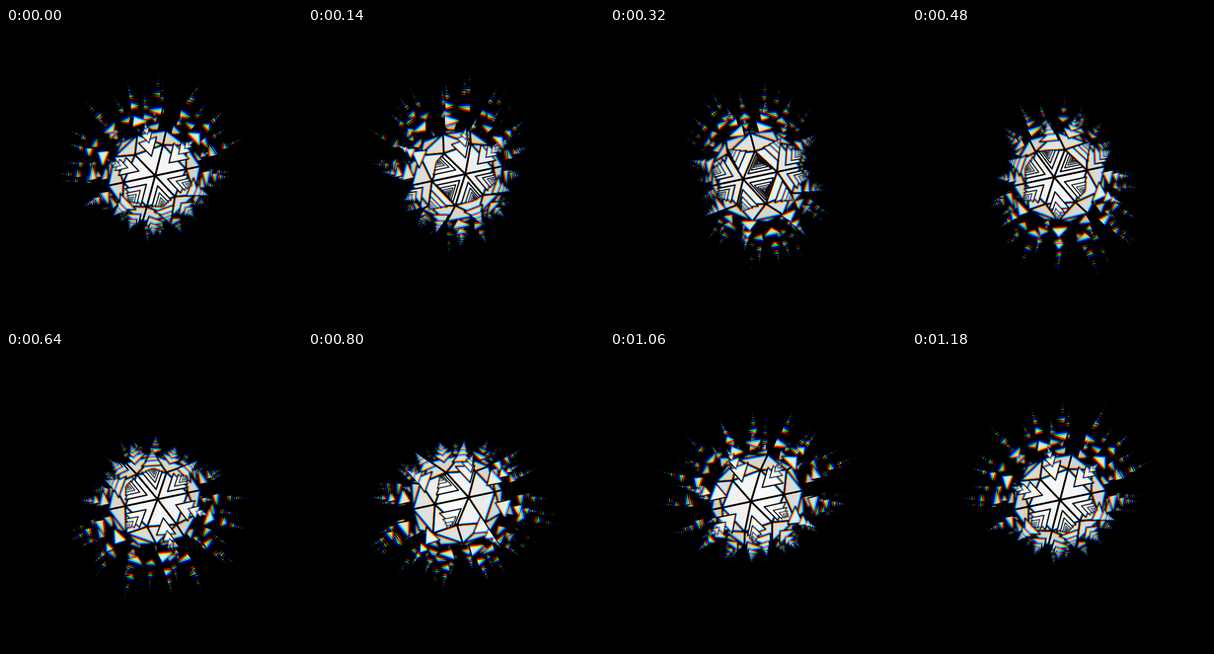
Animation, 500 px wide and 500 px high, one loop 1.2 s. Source, as an HTML page with a canvas:

```html
<!DOCTYPE html>
<html lang="en">
<head>
<meta charset="utf-8">
<title>Spiked sphere</title>
<style>
html, body { margin: 0; width: 100%; height: 100%; overflow: hidden; background: #000; }
canvas { display: block; width: 100vmin; height: 100vmin; }
</style>
</head>
<body>
<canvas id="stage" width="500" height="500"></canvas>
<script>
const LOOP = 1200, STEP = 20, SIZE = 500, MID = 250;
const DIST = 5.8, FOCUS = 461, TILT = -0.209;
const LAYERS = 8, SPREAD = 0.027;
const RAD = Math.PI / 180;

const ctx = document.getElementById('stage').getContext('2d');
const plate = document.createElement('canvas');
plate.width = plate.height = SIZE;
const ink = plate.getContext('2d');

const unit = v => { const l = Math.hypot(...v); return v.map(a => a / l); };
const mean = (...vs) => [0, 1, 2].map(i => vs.reduce((s, v) => s + v[i], 0) / vs.length);

// Icosahedron with poles on the y axis, each face split in four
function buildFaces() {
  const lat = Math.atan(0.5);
  const ring = (sign, turn) => Array.from({ length: 5 }, (_, k) => {
    const a = (turn + 72 * k) * RAD;
    return [Math.cos(lat) * Math.sin(a), sign * Math.sin(lat), Math.cos(lat) * Math.cos(a)];
  });
  const up = ring(1, -18), low = ring(-1, 18), big = [];
  for (let k = 0; k < 5; k++) {
    const n = (k + 1) % 5;
    big.push([[0, 1, 0], up[k], up[n]], [up[k], up[n], low[k]],
             [low[k], low[n], up[n]], [[0, -1, 0], low[k], low[n]]);
  }
  return big.flatMap(([a, b, c]) => {
    const ab = unit(mean(a, b)), bc = unit(mean(b, c)), ca = unit(mean(c, a));
    return [[a, ab, ca], [b, bc, ab], [c, ca, bc], [ab, bc, ca]];
  }).map(pts => {
    const mid = mean(...pts);
    return { pts, mid, out: unit(mid) };
  });
}

const faces = buildFaces();
const cosT = Math.cos(TILT), sinT = Math.sin(TILT);

function project([x, y, z]) {
  const k = FOCUS / (DIST - z);
  return [k * (x * cosT + y * sinT), k * (x * sinT - y * cosT)];
}

function buildTriangles(t) {
  const p = t / LOOP, a = (72 * p + 1.2) * RAD;
  const c = Math.cos(a), s = Math.sin(a);
  const spin = ([x, y, z]) => [x * c + z * s, y, z * c - x * s];
  const list = [];
  for (const f of faces) {
    const pts = f.pts.map(spin), mid = spin(f.mid), out = spin(f.out);
    // The swell climbs from the lower pole to the upper one
    const wave = Math.cos(2 * Math.PI * (p - 0.775 - 0.4 * out[1]));
    const tall = 0.87 + 0.45 * wave, shrink = 0.625 - 0.055 * wave;
    const shade = Math.round(188 + 66 * Math.max(0, out[2]) ** 2);
    for (let i = 0; i < LAYERS; i++) {
      const size = shrink ** i, lift = tall * (1 - size);
      const at = v => v.map((q, j) => mid[j] + (q - mid[j]) * size + out[j] * lift);
      const o = at(mid);
      list.push({
        pts: pts.map(v => project(at(v))),
        far: Math.hypot(o[0], o[1], DIST - o[2]),
        line: 0.8 + 2.2 * size,
        shade
      });
    }
  }
  return list.sort((m, n) => n.far - m.far);
}

function drawChannel(list, channel) {
  const k = 1 + (channel - 1) * SPREAD;
  ink.setTransform(1, 0, 0, 1, 0, 0);
  ink.fillStyle = '#000';
  ink.fillRect(0, 0, SIZE, SIZE);
  ink.setTransform(k, 0, 0, k, MID, MID);
  ink.strokeStyle = '#000';
  ink.lineJoin = 'round';
  for (const { pts, line, shade } of list) {
    const rgb = [0, 0, 0];
    rgb[channel] = shade;
    ink.fillStyle = `rgb(${rgb})`;
    ink.lineWidth = line;
    ink.beginPath();
    pts.forEach(([x, y]) => ink.lineTo(x, y));
    ink.closePath();
    ink.fill();
    ink.stroke();
  }
  ctx.drawImage(plate, 0, 0);
}

function draw(t) {
  const list = buildTriangles(t);
  ctx.globalCompositeOperation = 'source-over';
  ctx.fillStyle = '#000';
  ctx.fillRect(0, 0, SIZE, SIZE);
  ctx.globalCompositeOperation = 'lighter';
  for (let ch = 0; ch < 3; ch++) drawChannel(list, ch);
}

const start = performance.now();
let shown = -1;
function tick() {
  const t = Math.floor((performance.now() - start) % LOOP / STEP) * STEP;
  if (t !== shown) draw(shown = t);
  requestAnimationFrame(tick);
}
tick();
</script>
</body>
</html>
```
